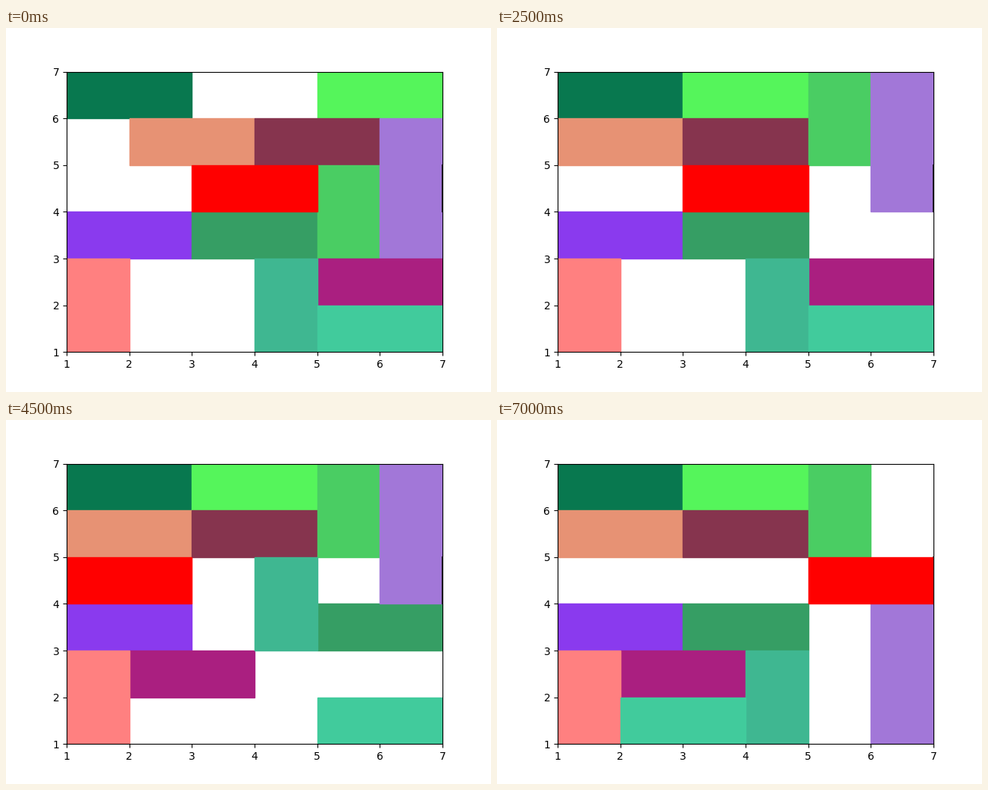
A matplotlib script that plays this animation: 640x480 px, repeating every 7.5 s.

```python
import matplotlib.pyplot as plt
from matplotlib.animation import FuncAnimation
from matplotlib.patches import Rectangle

# name: (column, row, width, height, colour), listed from back to front
CARS = {
    "pine": (1, 6, 2, 1, "#08784f"),
    "lime": (5, 6, 2, 1, "#55f55b"),
    "salmon": (2, 5, 2, 1, "#e79274"),
    "maroon": (4, 5, 2, 1, "#86344e"),
    "violet": (1, 3, 2, 1, "#8a3aee"),
    "forest": (3, 3, 2, 1, "#369e64"),
    "green": (5, 3, 1, 2, "#4acd63"),
    "lavender": (6, 3, 1, 3, "#a277d8"),
    "magenta": (5, 2, 2, 1, "#aa1f80"),
    "pink": (1, 1, 1, 2, "#ff8080"),
    "teal": (4, 1, 1, 2, "#3fb791"),
    "aqua": (5, 1, 2, 1, "#41cb9c"),
    "red": (3, 4, 2, 1, "#ff0000"),
}

# one move per step: car and how far it slides along its own axis
MOVES = [
    ("lime", -2), ("salmon", -1), ("maroon", -1), ("green", 2),
    ("lavender", 1), ("forest", 2), ("red", -2), ("teal", 2),
    ("magenta", -3), ("aqua", -3), ("teal", -2), ("forest", -2),
    ("lavender", -3), ("red", 4),
]

fig, ax = plt.subplots(figsize=(6.4, 4.8), dpi=100)
ax.set(xlim=(1, 7), ylim=(1, 7), xticks=range(1, 8), yticks=range(1, 8))

# exit gate: above every car except the red one
ax.plot([7, 7], [4, 5], color="black", lw=1.5, zorder=1.1)

patches = {}
for name, (x, y, w, h, color) in CARS.items():
    z = 1.2 if name == "red" else 1
    patches[name] = ax.add_patch(
        Rectangle((x, y), w, h, fc=color, ec=color, lw=1, zorder=z))


def update(step):
    for name, (x, y, w, h, _) in CARS.items():
        shift = sum(d for car, d in MOVES[:step] if car == name)
        patches[name].set_xy((x + shift, y) if w > h else (x, y + shift))
    return list(patches.values())


anim = FuncAnimation(fig, update, frames=len(MOVES) + 1, interval=500,
                     repeat=True, repeat_delay=0)
plt.show()
```
